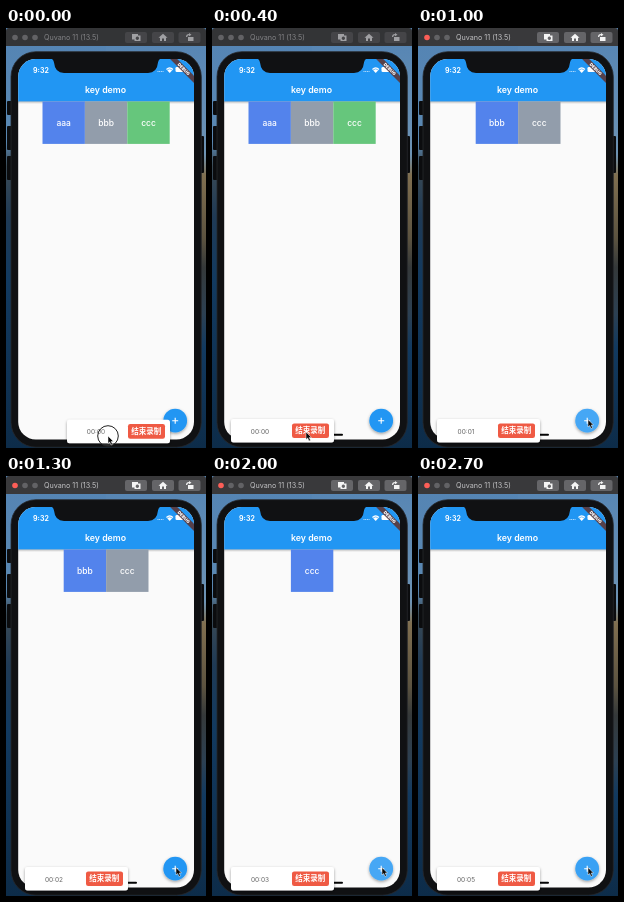
An HTML page that plays this animation: 200x420 px, repeating every 2.8 s.

```html
<!DOCTYPE html>
<html lang="en">
<head>
<meta charset="utf-8">
<title>key demo</title>
<style>
  html, body { margin: 0; width: 100%; height: 100%; overflow: hidden; background: #0d2740; }
  svg { display: block; width: 100vw; height: 100vh; }
  text { font-family: Inter, Roboto, sans-serif; }
  .mid { text-anchor: middle; }
  .cjk { font-family: "Noto Sans CJK SC", "Noto Sans CJK", sans-serif; font-weight: 700; }
</style>
</head>
<body>
<svg viewBox="0 0 200 420" preserveAspectRatio="none">
  <defs>
    <linearGradient id="coastLeft" x2="0" y2="1">
      <stop offset="0" stop-color="#5484b4"/>
      <stop offset=".27" stop-color="#5a88b2"/>
      <stop offset=".33" stop-color="#3a4a55"/>
      <stop offset=".45" stop-color="#1f3a55"/>
      <stop offset=".6" stop-color="#123a60"/>
      <stop offset="1" stop-color="#0d2c49"/>
    </linearGradient>
    <linearGradient id="coastRight" x2="0" y2="1">
      <stop offset="0" stop-color="#5484b4"/>
      <stop offset=".3" stop-color="#6d93b4"/>
      <stop offset=".35" stop-color="#806f50"/>
      <stop offset=".5" stop-color="#5c5340"/>
      <stop offset=".57" stop-color="#35393a"/>
      <stop offset=".68" stop-color="#2c4052"/>
      <stop offset=".76" stop-color="#123a60"/>
      <stop offset="1" stop-color="#0d2c49"/>
    </linearGradient>
    <linearGradient id="barShade" x2="0" y2="1">
      <stop offset="0" stop-opacity=".28"/>
      <stop offset="1" stop-opacity="0"/>
    </linearGradient>
    <filter id="soft" x="-30%" y="-50%" width="160%" height="200%">
      <feDropShadow dx="0" dy="1.3" stdDeviation="1.7" flood-opacity=".38"/>
    </filter>
    <clipPath id="screen"><rect x="12.200" y="31" width="175.800" height="380.500" rx="17.600"/></clipPath>
  </defs>

  <rect width="100" height="420" fill="url(#coastLeft)"/>
  <rect x="100" width="100" height="420" fill="url(#coastRight)"/>

  <!-- phone body -->
  <g fill="#0b0c0e">
    <rect x="1" y="73" width="6" height="14" rx="1"/>
    <rect x="1" y="98" width="6" height="24" rx="1"/>
    <rect x="1" y="128" width="6" height="24" rx="1"/>
    <rect x="193" y="108" width="5" height="37" rx="1"/>
    <rect x="5" y="23.700" width="190.300" height="395.500" rx="25" fill="#101113" stroke="#27292c" stroke-width=".8"/>
  </g>

  <g clip-path="url(#screen)">
    <rect x="12" y="31" width="177" height="382" fill="#fafafa"/>
    <rect x="12" y="73" width="177" height="3" fill="url(#barShade)"/>
    <rect x="12" y="31" width="177" height="42.400" fill="#2196f3"/>
    <path d="M44 30 Q47.500 31 48 34.500 Q49 45 58 45 H142 Q151 45 152 34.500 Q152.500 31 156 30Z" fill="#101113"/>
    <text x="27" y="44.700" font-size="7" font-weight="700" fill="#fff">9:32</text>
    <text class="mid" x="99.500" y="65" font-size="8.800" font-weight="600" fill="#fff">key demo</text>
    <g fill="#fff">
      <path d="M151.500 43.500h6" stroke="#fff" stroke-width="1" stroke-dasharray="1 .7" opacity=".7"/>
      <path d="M160 41 Q163.700 37.500 167.400 41 L163.700 45Z"/>
      <path d="M161 42 Q163.700 39.800 166.400 42" fill="none" stroke="#2196f3" stroke-width=".6"/>
      <rect x="169.500" y="39" width="9" height="5" rx="1.300"/>
      <rect x="179" y="40.500" width=".8" height="2" rx=".4"/>
    </g>
    <g transform="translate(188 31) rotate(45)">
      <rect x="-17" y="11.800" width="34" height="5.100" fill="#56404a"/>
      <text class="mid" y="15.900" font-size="4.400" font-weight="900" fill="#fff">DEBUG</text>
    </g>
    <g id="tiles"></g>
    <rect x="69" y="405.700" width="62" height="2.100" rx="1" fill="#050505"/>
    <g filter="url(#soft)"><circle cx="169.200" cy="392.700" r="11.900" fill="#2196f3"/></g>
    <circle id="glow" cx="169.200" cy="392.700" r="11.900" fill="#fff"/>
    <path d="M166.200 392.700h6M169.200 389.700v6" stroke="#fff" stroke-width="1.100"/>
  </g>

  <!-- simulator title bar -->
  <g>
    <path id="bar" d="M0 18V3Q0 0 3 0H197Q200 0 200 3V18Z"/>
    <circle id="closeDot" cx="9" cy="9.500" r="2.800"/>
    <circle cx="19" cy="9.500" r="2.800" fill="#626265"/>
    <circle cx="29" cy="9.500" r="2.800" fill="#626265"/>
    <text id="device" x="38" y="12.300" font-size="7.200">Quvano 11 (13.5)</text>
    <g id="buttons">
      <rect x="119" y="4" width="22" height="11" rx="2"/>
      <rect x="146" y="4" width="22" height="11" rx="2"/>
      <rect x="172.500" y="4" width="22" height="11" rx="2"/>
    </g>
    <g id="icons">
      <path d="M126 6h6v1.500h2.500v5.500h-6v-1.500H126zM131.300 8.500a1.700 1.700 0 1 0 .1 0z" fill-rule="evenodd"/>
      <path d="M152.500 9.700L157 5.700L161.500 9.700H160V13H158V10.500H156V13H154V9.700Z"/>
      <path d="M182 9h5.500v4h-5.500zM180 9Q180 6 183 6V5L185.500 6.700L183 8.300V7.200Q181.300 7 181.200 9Z"/>
    </g>
  </g>

  <!-- recorder panel, drawn from its top left corner -->
  <g id="panel">
    <rect width="103" height="23.500" rx="2.500" fill="#fff" filter="url(#soft)"/>
    <text id="clock" class="mid" x="29" y="14.600" font-size="6.500" fill="#666"></text>
    <rect x="61" y="4.400" width="37" height="14.600" rx="2.200" fill="#ef5a44"/>
    <text class="mid cjk" x="79.300" y="14.300" font-size="7.500" fill="#fff">结束录制</text>
  </g>

  <g id="cursor">
    <circle id="ring" r="10.300" fill="#fff" fill-opacity=".12" stroke="#222" stroke-width="1"/>
    <path d="M0 0V7.500L1.700 6L3 9L4.500 8.300L3.200 5.500H5.500Z" fill="#080808" stroke="#fff" stroke-width=".5"/>
  </g>
</svg>
<script>
  const LOOP = 2800, STEP = 100, TILE = 42.4;
  const el = id => document.getElementById(id);
  const tileColors = ['#5383ec', '#929dab', '#66c67c'];

  // Each row: start time, then the value held or approached.
  const itemSteps = [[0, ['aaa', 'bbb', 'ccc']], [1000, ['bbb', 'ccc']], [2000, ['ccc']], [2600, []]];
  const clockSteps = [[0, '00:00'], [600, '00:01'], [1200, '00:02'], [1700, '00:03'], [2200, '00:04'], [2700, '00:05']];
  const panelPath = [[0, 61, 391.7], [300, 19, 391]];
  const cursorPath = [[0, 102, 408], [300, 60, 407], [400, 94, 404], [700, 170, 391.5]];
  const presses = [900, 1900, 2500];

  const held = (steps, t) => steps.filter(s => s[0] <= t).pop()[1];

  function along(path, t) {
    const i = path.findIndex(p => p[0] > t);
    if (i < 0) return path[path.length - 1].slice(1);
    const [t0, x0, y0] = path[i - 1], [t1, x1, y1] = path[i];
    const k = (t - t0) / (t1 - t0), e = k * k * (3 - 2 * k);
    return [x0 + (x1 - x0) * e, y0 + (y1 - y0) * e];
  }

  function drawTiles(names) {
    const left = 100.1 - names.length * TILE / 2;
    el('tiles').innerHTML = names.map((name, i) => {
      const x = left + i * TILE;
      return `<rect x="${x}" y="73.500" width="${TILE}" height="${TILE}" fill="${tileColors[i]}"/>
        <text class="mid" x="${x + TILE / 2}" y="98" font-size="8.500" font-weight="500" fill="#fff">${name}</text>`;
    }).join('');
  }

  function draw(t) {
    const active = t >= 1000;
    drawTiles(held(itemSteps, t));
    el('clock').textContent = held(clockSteps, t);
    el('panel').setAttribute('transform', `translate(${along(panelPath, t)})`);
    el('cursor').setAttribute('transform', `translate(${along(cursorPath, t)})`);
    el('ring').style.opacity = t < 300 || presses.includes(t) ? 1 : 0;

    const since = Math.min(...presses.map(p => t - p - STEP).filter(d => d >= 0));
    el('glow').style.opacity = since < 300 ? .16 * (1 - since / 300) : 0;

    el('bar').style.fill = active ? '#39393b' : '#333436';
    el('closeDot').style.fill = active ? '#fc5e57' : '#626265';
    el('device').style.fill = active ? '#c4c4c6' : '#838386';
    el('buttons').style.fill = active ? '#656568' : '#454548';
    el('icons').style.fill = active ? '#f4f4f4' : '#a0a0a3';
  }

  let last = -1;
  function tick() {
    const t = Math.floor(performance.now() % LOOP / STEP) * STEP;
    if (t !== last) draw(last = t);
    requestAnimationFrame(tick);
  }
  tick();
</script>
</body>
</html>
```
